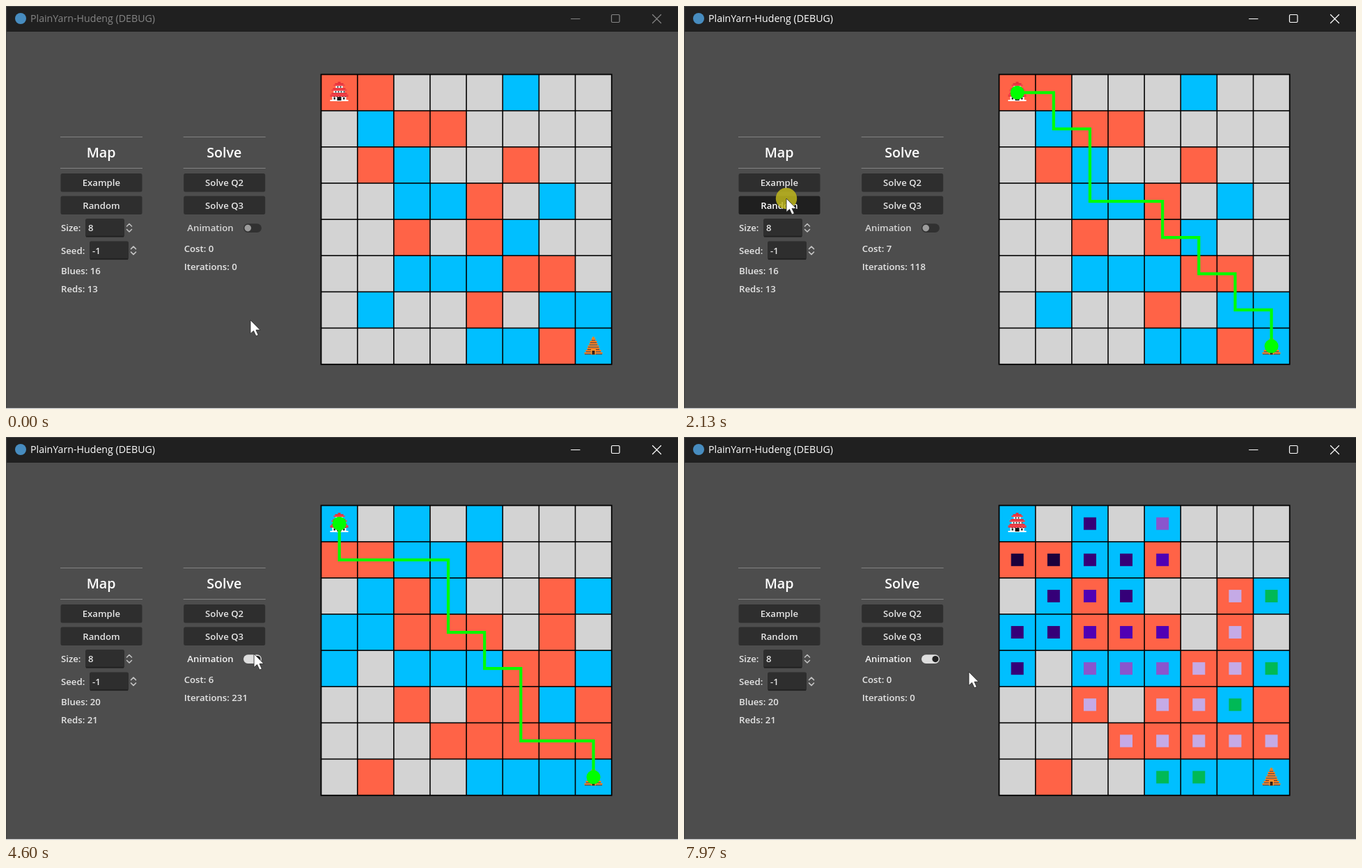
An HTML page for the animation above (8 s loop, 965 px wide and 580 px high).

```html
<!DOCTYPE html>
<html lang="en">
<head>
<meta charset="utf-8">
<title>Grid path solver</title>
<style>
  html, body { margin: 0; width: 100%; height: 100%; overflow: hidden; background: #4d4d4d; }
  svg { display: block; width: 965px; height: 580px; font: 600 13.2px "Open Sans", "Noto Sans", sans-serif; }
  text { fill: #e6e6e6; white-space: pre; }
  .mid { text-anchor: middle; }
  .head { font-size: 19.7px; fill: #fff; }
  .title { font-size: 14.2px; font-weight: 400; }
  .line { fill: none; stroke-linecap: round; stroke-linejoin: round; }
</style>
</head>
<body>
<svg id="stage" viewBox="0 0 965 580"></svg>
<script>
const LOOP = 8000, X0 = 452.6, Y0 = 98.6, CELL = 52.13;
const FILL = { R: '#ff6347', B: '#00bfff', '.': '#d3d3d3' };
const maps = [
  'RR...B.. .BRR.... .RB..R.. ..BBR.B. ..R.RB.. ..BBBRR. .B..R.BB ....BBRB',
  'B.B.B... RRBBR... .BRB..RB BBRRR.R. B.BBBRRB ..R.RRBR ...RRRRR .R..BBBB'
].map(m => m.split(' '));
const routes = [
  '00 10 11 21 23 43 44 54 55 65 66 76 77',
  '00 01 31 33 43 44 54 56 76 77'
];
// time, x, y of the pointer tip
const moves = [
  [60, 351, 452], [500, 288, 248], [860, 288, 248], [1180, 291, 287],
  [1600, 291, 287], [2070, 147, 277], [2280, 147, 277], [2690, 290, 250],
  [2860, 290, 250], [3120, 291, 284], [3750, 291, 284], [4340, 361, 318],
  [4550, 361, 318], [4830, 305, 250], [4995, 305, 250], [5330, 409, 338]
];
const presses = [[710, 780], [1450, 1590], [2130, 2190], [2760, 2830],
  [3590, 3740], [4400, 4470], [4890, 4960]];
// time, map, route shown, cost, iterations
const states = [
  [0, 0, false, 0, 0], [780, 0, true, 7, 53], [1590, 0, true, 7, 118],
  [2190, 1, false, 0, 0], [2830, 1, true, 6, 106], [3740, 1, true, 6, 231],
  [4960, 1, false, 0, 0]
];
const buttons = [['Example', 78.5, 241], ['Random', 78.5, 273.6],
  ['Solve Q2', 255.2, 241], ['Solve Q3', 255.2, 273.6]];

const rect = (x, y, w, h, fill, r = 0) =>
  `<rect x="${x}" y="${y}" width="${w}" height="${h}" fill="${fill}" rx="${r}"/>`;
const disc = (x, y, r, fill) => `<circle cx="${x}" cy="${y}" r="${r}" fill="${fill}"/>`;
const text = (s, x, y, cls = '', fill = '') =>
  `<text x="${x}" y="${y}" class="${cls}"${fill && ` style="fill:${fill}"`}>${s}</text>`;
const line = (d, stroke, w = 1.2) =>
  `<path class="line" d="${d}" stroke="${stroke}" stroke-width="${w}"/>`;
const mid = (c, r) => [X0 + (c + .5) * CELL, Y0 + (r + .5) * CELL];

// Level by level search: entering the other colour opens the next level.
function search(map) {
  const seen = { '0,0': true }, found = [], levels = [[[0, 0]]];
  for (let n = 0; n < levels.length; n++)
    for (const [c, r] of levels[n])
      for (const [dc, dr] of [[1, 0], [-1, 0], [0, 1], [0, -1]]) {
        const x = c + dc, y = r + dr, kind = map[y]?.[x];
        if (!kind || kind === '.' || seen[[x, y]]) continue;
        seen[[x, y]] = true;
        const level = n + (kind === map[r][c] ? 0 : 1);
        (levels[level] ??= []).push([x, y]);
        found.push({ x, y, level });
      }
  return found;
}
const found = search(maps[1]);
found.forEach((f, i) => f.time = 5460 + Math.floor(1.24 * (i - 5)) * 67.8);

// black, then violet, then white; the newest level is green
function shade(u) {
  if (u === 1) return '#00b956';
  const v = [80, 0, 180];
  return `rgb(${v.map(a => u < .5 ? a * u * 2 : a + (255 - a) * (u * 2 - 1))})`;
}

function marks(t) {
  const shown = found.filter(f => f.time <= t);
  const top = Math.max(...shown.map(f => f.level));
  return shown.map(f => {
    const [x, y] = mid(f.x, f.y);
    return rect(x - 9, y - 9, 18, 18, shade(f.level / top));
  }).join('');
}

function board(map) {
  let s = rect(451.6, 97.6, 419, 419, '#000');
  map.forEach((row, r) => [...row].forEach((k, c) =>
    s += rect(X0 + c * CELL + .8, Y0 + r * CELL + .8, CELL - 1.6, CELL - 1.6, FILL[k])));
  return s;
}

function pagoda() {
  const bar = (w, y, h, fill) => rect(478.5 - w / 2, y, w, h, fill);
  let s = bar(4, 109, 2, '#e8323c');
  [[12, 111], [18, 118], [22, 125]].forEach(([w, y]) => {
    s += bar(w, y, 2, '#e8323c') + bar(w + 4, y + 2, 2, '#f0444a');
    s += bar(w - 2, y + 4, 3, '#fff');
    for (let x = -w / 2 + 3; x < w / 2 - 2; x += 4) s += rect(478.5 + x, y + 4.5, 2, 2, '#222');
  });
  return s + bar(26, 129, 1.5, '#e8323c') + bar(20, 131, 5, '#fff') + bar(26, 135, 2, '#fff') +
    bar(6, 131, 5, '#111') + rect(470.5, 131.5, 2.5, 3, '#222') + rect(484, 131.5, 2.5, 3, '#222');
}

function tower() {
  const bar = (w, y, h, fill) => rect(843.5 - w / 2, y, w, h, fill);
  let s = bar(3, 476, 3, '#ff8a1e');
  [6, 10, 12, 16, 18, 22, 26].forEach((w, i) =>
    s += bar(w, 478.5 + i * 3.3, 2.3, '#ff7a1c') + bar(w - 1, 480.8 + i * 3.3, 1, '#6b3526'));
  return s + bar(7, 494, 7.5, '#ff9a30') + bar(4, 496, 5.5, '#30201c');
}

function route(str) {
  const pts = str.split(' ').map(p => mid(+p[0], +p[1])), end = pts[pts.length - 1];
  return `<polyline points="${pts.join(' ')}" fill="none" stroke="#0f0" stroke-width="4.2"/>` +
    disc(...pts[0], 10, '#0f0') + disc(...end, 10, '#0f0');
}

function spinner(label, value, x, y) {
  const a = x + 63;
  return text(label, 79, y + 18) + rect(x, y, 56, 26.5, '#2e2e2e', 2.5) +
    rect(x + 1, y + 24.8, 54, 1.7, '#202020') + text(value, x + 4, y + 18) +
    line(`M${a - 3.5} ${y + 11}l3.5 -3.5 3.5 3.5M${a - 3.5} ${y + 15.5}l3.5 3.5 3.5 -3.5`, '#c4c4c4', 1.5);
}

const panel = rect(0, 0, 965, 580, '#4d4d4d') + rect(0, 0, 965, 37, '#202020') +
  rect(0, 0, 965, 1, '#444') + rect(0, 0, 1.2, 580, '#444') + rect(0, 578.8, 965, 1.2, '#eee') +
  disc(21, 18, 8, '#478cbf') +
  [[78, 'Map'], [254.7, 'Solve']].map(([x, s]) =>
    rect(x, 188, 118, 1, '#828282') + rect(x, 233, 118, 1, '#828282') +
    text(s, x + 58.6, 218, 'mid head')).join('') +
  spinner('Size:', '8', 114, 306) + spinner('Seed:', '-1', 120, 338.6);
const boards = maps.map(board), icons = pagoda() + tower();

function pointer(t) {
  const i = moves.findIndex(m => m[0] > t);
  if (i === 0) return moves[0].slice(1);
  if (i < 0) return moves[moves.length - 1].slice(1);
  const [t0, x0, y0] = moves[i - 1], [t1, x1, y1] = moves[i];
  const u = (t - t0) / (t1 - t0), e = u * u * (3 - 2 * u);
  return [x0 + (x1 - x0) * e, y0 + (y1 - y0) * e];
}

function chrome(active) {
  const ink = active ? '#fff' : '#858585';
  return text('PlainYarn-Hudeng (DEBUG)', 35, 23.2, 'title', ink) +
    line('M811.5 18.5h12.5M871 12.5h8.5q1.5 0 1.5 1.5v8q0 1.5 -1.5 1.5h-8.5q-1.5 0 -1.5 -1.5v-8q0 -1.5 1.5 -1.5zM928.5 12.5l12 12M940.5 12.5l-12 12', ink);
}

function button([label, x, y], px, py, down) {
  const over = px >= x && px < x + 117 && py >= y && py < y + 26.5;
  const fill = !over ? '#2e2e2e' : down ? '#1f1f1f' : '#424242';
  return rect(x, y, 117, 26.4, fill, 2.5) +
    text(label, x + 58.4, y + 18.2, 'mid', over ? '#fff' : '');
}

function toggle(on) {
  return text('Animation', 260.3, 324.3, '', on ? '#f4f4f4' : '#d6d6d6') +
    rect(341, 313.3, 26, 12.6, on ? '#dedede' : '#313131', 6.3) +
    disc(on ? 361 : 347.3, 319.6, on ? 4.6 : 4.8, on ? '#222' : '#9c9c9c');
}

function frame(t) {
  const [, map, solved, cost, iterations] = states.filter(s => s[0] <= t).pop();
  const [px, py] = pointer(t);
  const down = presses.some(([a, b]) => t >= a && t < b);
  const count = k => maps[map].join('').split(k).length - 1;
  return panel + chrome(t >= 710) +
    buttons.map(b => button(b, px, py, down)).join('') + toggle(t >= 4470) +
    text('Blues: ' + count('B'), 79, 386) + text('Reds: ' + count('R'), 79, 412) +
    text('Cost: ' + cost, 255.7, 353.6) + text('Iterations: ' + iterations, 255.7, 379.5) +
    boards[map] + icons + (solved ? route(routes[map]) : '') + marks(t) +
    (down ? disc(px, py, 15.2, 'rgba(190,182,28,.85)') : '') +
    `<path transform="translate(${px} ${py})" d="M0 0V19.5L4.5 15.5L8 23L11.3 21.6L8 14.3H14Z" fill="#fff" stroke="#222" stroke-width=".8"/>`;
}

const stage = document.getElementById('stage');
const start = performance.now();
function tick() {
  stage.innerHTML = frame((performance.now() - start) % LOOP);
  requestAnimationFrame(tick);
}
tick();
</script>
</body>
</html>
```
